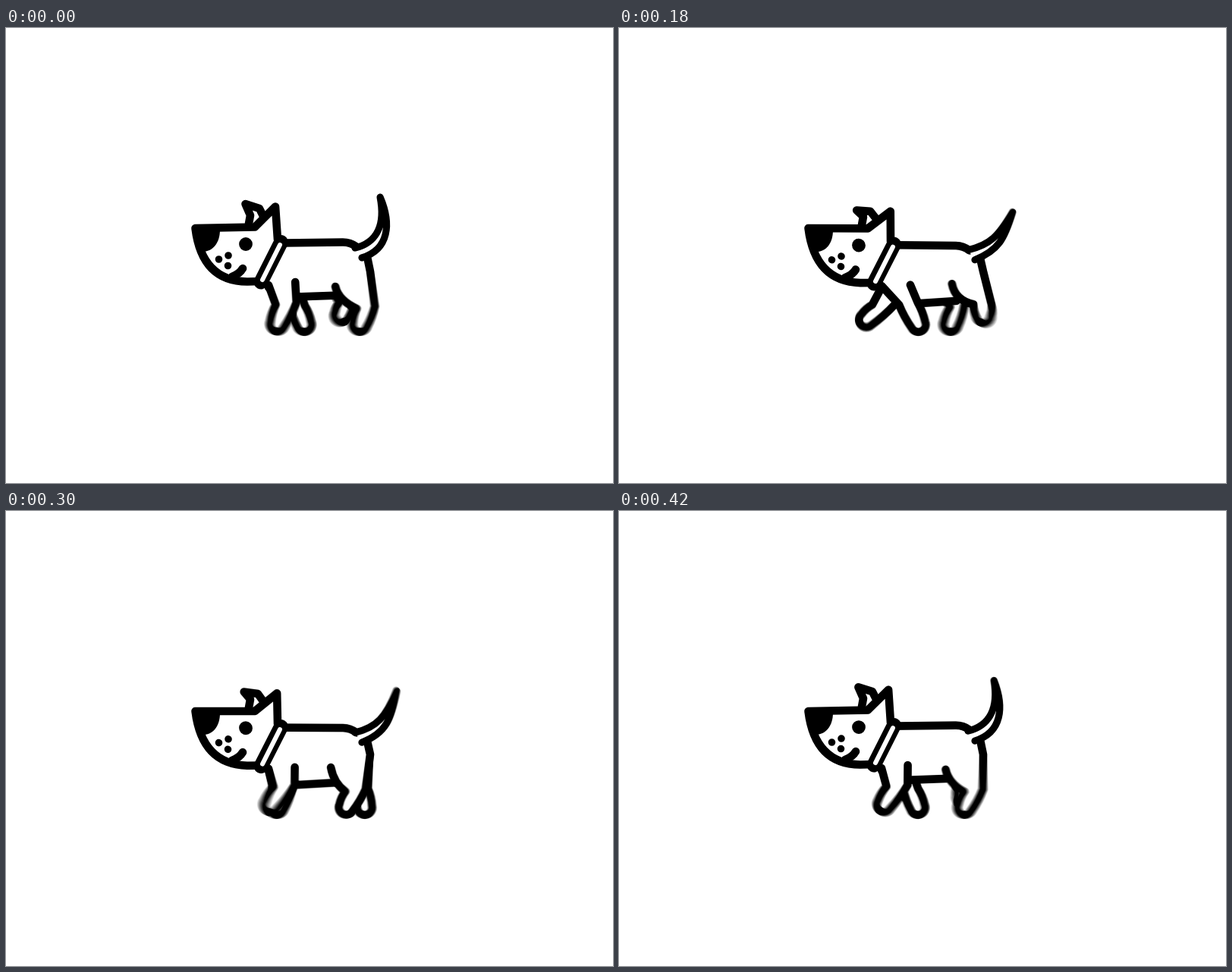
Animation of 800x600 px, one loop 0.45 s. Source, as an HTML page with a canvas:

```html
<!DOCTYPE html>
<html>
<head>
<meta charset="utf-8">
<title>Walking dog</title>
<style>
  html, body { margin: 0; width: 100%; height: 100%; overflow: hidden; background: #fff; }
  canvas { display: block; }
</style>
</head>
<body>
<canvas id="stage" width="800" height="600"></canvas>
<script>
const LOOP = 450, STEP = 30, SHUTTER = 18, SAMPLES = 12;
const LINE = 10.6, GROUND = 391, FOOT = 9.8;
const stage = document.getElementById('stage').getContext('2d');
const layer = document.createElement('canvas');
layer.width = 800;
layer.height = 600;
const g = layer.getContext('2d');

const mix = (a, b, k) => a + (b - a) * k;
const cosDeg = degrees => Math.cos(degrees * Math.PI / 180);

// Gait: harmonics of the stride, and height and moment (degrees) of the lift.
const FORE = { second: 6.4, third: -3, lift: 11, liftAt: 290 };
const HIND = { second: -1.5, third: 2.2, lift: 14, liftAt: 165 };

// The knees follow the foot's swing u, about -1 to 1; far legs run half a cycle later.
const LEGS = {
  nearFore: { gait: FORE, phase: 0, mid: 368.4, reach: 27, lag: 122,
    shin: u => 359.5 + 10 * u, calf: u => 386 + 8 * u, shinY: 365, calfY: 362 },
  farFore: { gait: FORE, phase: 180, mid: 356, reach: 33, lag: 148,
    shin: u => 352 + 20 * u, calf: u => 377 + 15 * u, shinY: 368, calfY: 366 },
  nearHind: { gait: HIND, phase: 0, mid: 466, reach: 24, lag: 91,
    shin: u => 462 + 13.8 * u - 8.6 * u * u, calf: u => 486 + 12 * u - 6 * u * u, shinY: 370, calfY: 367 },
  farHind: { gait: HIND, phase: 180, mid: 450, reach: 26, lag: 81,
    shin: u => 444 + 16 * u, calf: u => 463 + 16 * u, shinY: 368, calfY: 366 }
};

function poseLeg({ gait, phase, mid, reach, lag, shin, calf, shinY, calfY }, t) {
  const a = 360 * t / LOOP + phase;
  const swing = reach * cosDeg(a - lag) + gait.second * cosDeg(2 * a) + gait.third * cosDeg(3 * a);
  const lift = gait.lift * Math.max(0, cosDeg(a - gait.liftAt)) ** 3;
  const u = swing / reach;
  return {
    u,
    foot: [mid + swing, GROUND - lift],
    shin: [shin(u), shinY - .5 * lift],
    calf: [calf(u), calfY - .2 * lift]
  };
}

function shape(draw, width = LINE, fill = true) {
  g.beginPath();
  draw();
  if (fill) g.fill();
  g.lineWidth = width;
  g.stroke();
}

function polyline(...points) {
  points.forEach(([x, y], i) => i ? g.lineTo(x, y) : g.moveTo(x, y));
}

function dot(x, y, r) {
  g.beginPath();
  g.arc(x, y, r, 0, 7);
  g.fill();
}

// Continues the path from the front knee, round the foot, to the back knee.
function lowerLeg({ shin, foot: [fx, fy], calf }) {
  const tangent = ([x, y], side) => {
    const d = Math.hypot(x - fx, y - fy);
    return Math.atan2(y - fy, x - fx) + side * Math.acos(Math.min(1, FOOT / d));
  };
  const around = (angle, r) => [fx + r * Math.cos(angle), fy + r * Math.sin(angle)];
  const bulge = ([x, y], angle) => {
    const [ox, oy] = around(angle, FOOT + 4);
    return [(x + ox) / 2, (y + oy) / 2];
  };
  const start = tangent(shin, -1), end = tangent(calf, 1);
  g.quadraticCurveTo(...bulge(shin, start), ...around(start, FOOT));
  g.arc(fx, fy, FOOT, start, end, true);
  g.quadraticCurveTo(...bulge(calf, end), ...calf);
}

function farLeg(leg, top, back) {
  shape(() => {
    polyline(top, leg.shin);
    lowerLeg(leg);
    g.lineTo(...back);
  });
}

function drawLegsAndBody(t, s) {
  const fore = poseLeg(LEGS.nearFore, t), hind = poseLeg(LEGS.nearHind, t);
  const farFore = poseLeg(LEGS.farFore, t), farHind = poseLeg(LEGS.farHind, t);
  const hipX = 434 + 8 * hind.u;
  const bellyFront = [fore.calf[0], 354.5 + 9.5 * s];
  const bellyBack = [hipX + 6, 352.5 + 8 * s];

  farLeg(farFore, [346, 342], [385, 340]);
  farLeg(farHind, [farHind.shin[0] - 8, farHind.shin[1] - 12], [479, 325]);

  g.beginPath();
  polyline([347, 340], [370, 286], [445, 286], [462, 292], [477, 305], [478, 322], bellyBack, bellyFront);
  g.fill();
  shape(() => polyline(bellyFront, bellyBack), LINE, false);

  shape(() => {
    polyline([346, 339 + s], fore.shin);
    lowerLeg(fore);
    g.lineTo(382 + 2 * fore.u, 335 + 4 * s);
  });
  shape(() => {
    g.moveTo(hipX, 341 - 4 * s);
    g.quadraticCurveTo(hipX + 4, 359, ...hind.shin);
    lowerLeg(hind);
    g.lineTo(480, 321);
    g.lineTo(476.5, 304 + 2 * s);
  });
}

function drawTail(s) {
  const arc = 4 * s * (1 - s);
  const tip = [mix(493, 520, s) + 3 * arc, mix(223, 245, s) - 2 * arc];
  shape(() => {
    g.moveTo(460, mix(290, 293, s));
    g.bezierCurveTo(mix(485, 490, s), mix(284, 286, s), mix(501, 500, s), mix(264, 275, s), ...tip);
    g.bezierCurveTo(508, mix(258, 280, s), mix(505, 500, s), mix(292, 293, s), 469, mix(303, 306, s));
  }, 9.2);
}

function drawHead(s) {
  shape(() => polyline([320, 258], [322, 247], [mix(315.5, 313, s), mix(232, 239.5, s)],
    [mix(334, 331, s), mix(238, 240, s)], [341, 252]));
  shape(() => {
    polyline([335, 334], [318, 334.5]);
    g.bezierCurveTo(270, 334, 254, 300, 249.5, 264);
    g.lineTo(328, 262.5);
    g.lineTo(mix(355, 358, s), mix(235.5, 239.5, s));
    g.lineTo(358, 279);
  });

  g.fillStyle = '#000';
  g.beginPath();
  g.moveTo(249, 264);
  g.lineTo(282, 266);
  g.bezierCurveTo(282, 284, 272, 295, 259, 295);
  g.fill();
  dot(316, 285, 8.9);
  dot(280.5, 305, 4.8);
  dot(293, 300, 4.8);
  dot(292.5, 313.5, 4.8);
  shape(() => {
    g.moveTo(312, 317);
    g.quadraticCurveTo(308, 324, 298, 328);
  }, LINE, false);

  shape(() => polyline([362.5, 282.5], [336, 335]), 19, false);
  g.strokeStyle = '#fff';
  shape(() => polyline([361, 286], [338, 332]), 6, false);
}

function drawDog(t) {
  const s = .5 - .5 * Math.cos(2 * Math.PI * (t + 5) / LOOP);
  const tilt = .025 * s;
  const level = () => g.setTransform(1, 0, 0, 1, 0, 0);
  const lean = () => g.setTransform(1, tilt, 0, 1, 0, -248 * tilt);

  level();
  g.fillStyle = '#fff';
  g.fillRect(0, 0, 800, 600);
  g.strokeStyle = '#000';
  g.lineCap = g.lineJoin = 'round';
  drawLegsAndBody(t, s);

  lean();
  shape(() => {
    polyline([366, 283.5], [444, 282.5]);
    g.quadraticCurveTo(454, 282.5, 462, 288.5);
  }, LINE, false);
  level();
  drawTail(s);
  lean();
  drawHead(s);
}

// Averages several moments to give motion blur.
function render(t) {
  for (let i = 0; i < SAMPLES; i++) {
    drawDog(t + SHUTTER * ((i + .5) / SAMPLES - .5));
    stage.globalAlpha = 1 / (i + 1);
    stage.drawImage(layer, 0, 0);
  }
}

let shown = -1;
const began = performance.now();
function tick() {
  const t = Math.floor(((performance.now() - began) % LOOP) / STEP) * STEP;
  if (t !== shown) render(shown = t);
  requestAnimationFrame(tick);
}
tick();
</script>
</body>
</html>
```
